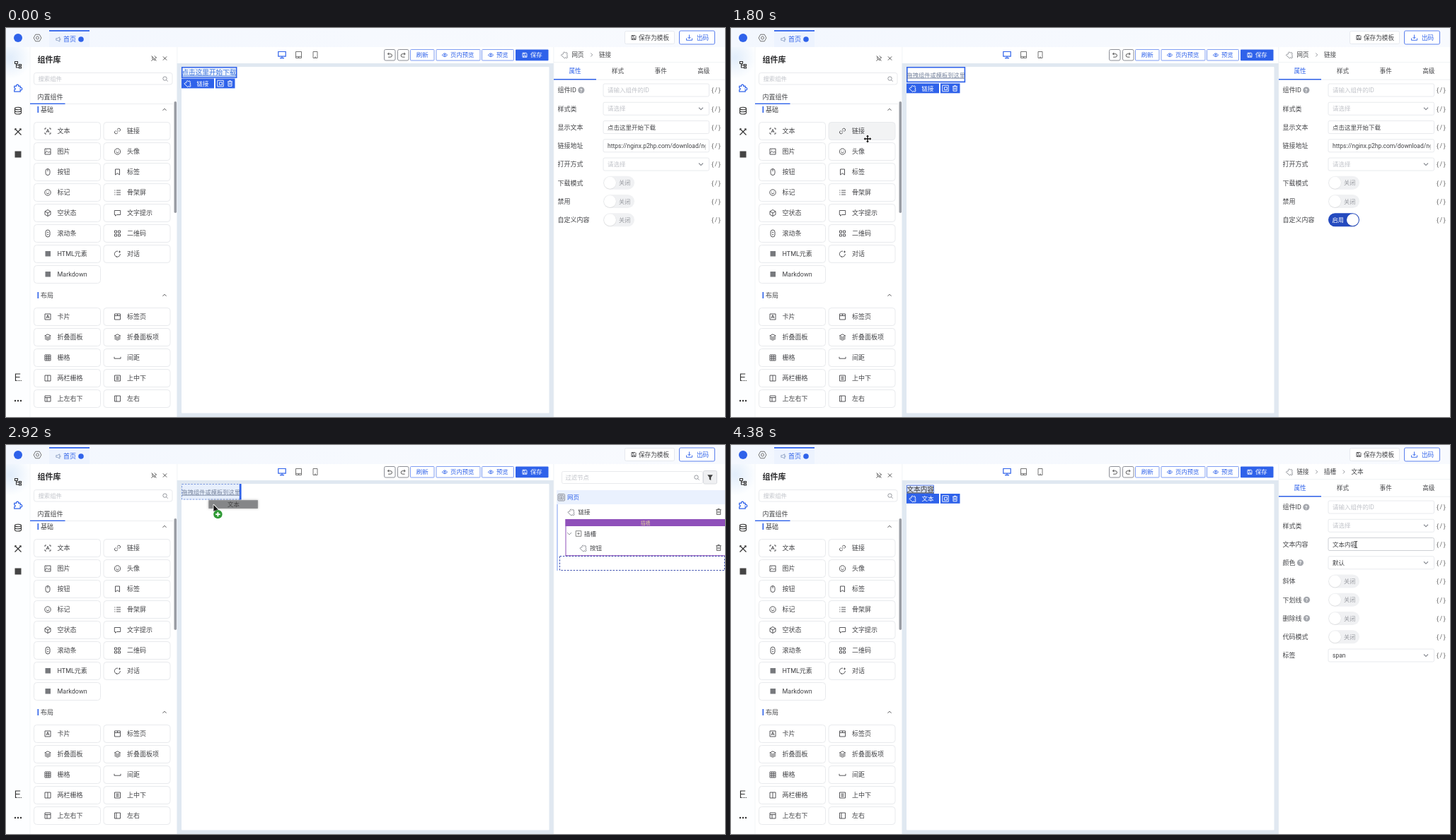
An HTML page with a canvas for the animation above (4.4 s loop, 1016 px wide and 551 px high).

```html
<!DOCTYPE html>
<html lang="zh-CN">
<head>
<meta charset="utf-8">
<title>组件库</title>
<style>
html, body { margin: 0; width: 100%; height: 100%; overflow: hidden; background: #fff; }
canvas { display: block; width: 1016px; height: 551px; }
</style>
</head>
<body>
<canvas id="stage"></canvas>
<script>
const W = 1016, H = 551, LOOP = 4400;
const cv = document.getElementById('stage');
const dpr = window.devicePixelRatio || 1;
cv.width = W * dpr;
cv.height = H * dpr;
const g = cv.getContext('2d');

const BLUE = '#2f62ea', INK = '#444548', GREY = '#8a8d94', HINT = '#c0c3c9', LINE = '#e8eaed', PURPLE = '#8f50ba';
const FONT = 'Roboto, "Noto Sans CJK SC", "Noto Sans CJK", "Noto Sans SC", sans-serif';

// Icon outlines, centred on 0,0
const BOX = 'M-4-4H4V4H-4Z';
const ICONS = {
  text: 'M-4-2V-4H-2M2-4H4V-2M4 2V4H2M-2 4H-4V2M-2 2L0-2.5 2 2M-1.3.8H1.3',
  link: 'M-1.2 1.2L1.2-1.2M-.6-2L1-3.5A2 2 0 0 1 3.8-.8L2.2.8M.6 2L-1 3.5A2 2 0 0 1-3.8.8L-2.2-.8',
  image: BOX + 'M-4 2L-1-.5 1 1.5 2.5 0 4 1.5M-2-2.2h.8',
  face: 'M4.2 0A4.2 4.2 0 1 1-4.2 0 4.2 4.2 0 1 1 4.2 0M-2 .8Q0 3 2 .8M-1.6-1.4v.8M1.6-1.4v.8',
  mouse: 'M-3-1.5A3 3 0 0 1 3-1.5V1.5A3 3 0 0 1-3 1.5ZM0-4.5V-1',
  mark: 'M-3-4H3V4L0 1.8-3 4Z',
  list: 'M-1.5-3H4.5M-1.5 0H4.5M-1.5 3H4.5M-4.2-3h1.2M-4.2 0h1.2M-4.2 3h1.2',
  cube: 'M0-4.5L4-2.3V2.3L0 4.5-4 2.3V-2.3ZM-4-2.3L0 0 4-2.3M0 0V4.5',
  bubble: 'M-4.2-3.5H4.2V2.5H-1L-3 4.2V2.5H-4.2Z',
  scroll: 'M-3-2A3 3 0 0 1 3-2V2A3 3 0 0 1-3 2ZM-1.2-1L0-2.2 1.2-1M-1.2 1L0 2.2 1.2 1',
  four: 'M-4-4h3v3h-3ZM1-4h3v3h-3ZM-4 1h3v3h-3ZM1 1h3v3h-3Z',
  talk: 'M3.8 0A4 4 0 1 1 .5-3.8M-2 3L-1 4.6M3-4.4v2.8M1.6-3h2.8',
  card: BOX + 'M-2 2L0-2.5 2 2M-1.3.8H1.3',
  tabs: BOX + 'M-4-1.5H4M0-4V-1.5',
  layers: 'M0-4.2L4.2-2 0 .2-4.2-2ZM-4.2 0L0 2.2 4.2 0M-4.2 2L0 4.2 4.2 2',
  grid: BOX + 'M-4-1.3H4M-4 1.3H4M-1.3-4V4M1.3-4V4',
  space: 'M-4.5-1.2V1.2H4.5V-1.2',
  cols: BOX + 'M0-4V4',
  rows: BOX + 'M-2-1.8H2M-2 0H2M-2 1.8H2',
  frame: BOX + 'M-4-1.5H4M-1-1.5V4',
  side: BOX + 'M-1.5-4V4',
  puzzle: 'M-4.5-2.5H-1.8A1.6 1.6 0 1 1 1.2-2.5H3.5V-.2A1.6 1.6 0 1 1 3.5 2.4V4.8H-4.5V2.5A1.3 1.3 0 1 0-4.5-.2Z',
  trash: 'M-3.8-3H3.8M-1.2-3V-4.3H1.2V-3M-2.8-3V4.2H2.8V-3M-1-1V2.2M1-1V2.2',
  copy: 'M-4.5-4.5H4.5V4.5H-4.5ZM-1.5 2.2V-1.8H2.5V2.2Z',
  eye: 'M-4 0Q0-5.4 4 0 0 5.4-4 0ZM1.1 0A1.1 1.1 0 1 1-1.1 0 1.1 1.1 0 1 1 1.1 0',
  save: 'M-3.3-3.3H2.3L3.3-2.3V3.3H-3.3ZM-1.5 3.3V1H1.5V3.3M-1.5-3.3V-1.5H1',
  down: 'M0-4V1.5M-2-.5L0 1.5 2-.5M-4 1V3.8H4V1',
  up: 'M-2.5 1.3L0-1.3 2.5 1.3',
  drop: 'M-3-1.5L0 1.5 3-1.5',
  next: 'M-1.2-2.5L1.2 0-1.2 2.5',
  close: 'M-2.6-2.6L2.6 2.6M2.6-2.6L-2.6 2.6',
  pin: 'M-3.8-3.8L3.8 3.8M1-4L4-1 1.5.2M-1.5-2L-3.2-.6.8 3.2 2 1.6M-1.2 1.4L-4 4',
  find: 'M2.2-.4A2.7 2.7 0 1 1-3.2-.4 2.7 2.7 0 1 1 2.2-.4M1.5 1.6L3.6 3.7',
  hex: 'M-2.8-4.8H2.8L5.4 0 2.8 4.8H-2.8L-5.4 0ZM2 0A2 2 0 1 1-2 0 2 2 0 1 1 2 0',
  tree: 'M-4.5-4.5h4v3h-4ZM1.5-.5h3v2h-3ZM1.5 3h3v2h-3ZM-2.5-1.5V4H1.5M-2.5.5H1.5',
  data: 'M-4.5-3A4.5 1.8 0 1 1 4.5-3 4.5 1.8 0 1 1-4.5-3V3.2A4.5 1.8 0 0 0 4.5 3.2V-3M-4.5 0A4.5 1.8 0 0 0 4.5 0',
  tools: 'M-4.5-4.5L4.5 4.5M4.5-4.5L-4.5 4.5M-4.8-2.6L-2.6-4.8M2.4-4.6L4.6-2.4',
  lang: 'M3.2-5H-3.5V4.5H-1.5M-3.5-.5H2.6M-.4 4.5h1.2M1.8 4.5h1.2M4 4.5h1',
  desk: 'M-5.2-4.5H5.2V2.2H-5.2ZM0 2.2V4.6M-3 4.6H3',
  pad: 'M-4-4.5H4V4.5H-4ZM-4 2.4H4M-.7 3.5H.7',
  phone: 'M-3-4.5H3V4.5H-3ZM-1 3.2H1',
  undo: 'M-1-3.8L-3.2-1.8-1 .2M-3.2-1.8H1A2.4 2.4 0 0 1 1 3.2H-2.5',
  redo: 'M1-3.8L3.2-1.8 1 .2M3.2-1.8H-1A2.4 2.4 0 0 0-1 3.2H2.5',
  horn: 'M-3.5-1.5H-1.5L2-3.5V3.5L-1.5 1.5H-3.5ZM3.2-1.2V1.2',
  slot: BOX + 'M0-1.8V1.8M-1.8 0H1.8',
  funnel: 'M-3.8-3.8H3.8L1.2 0V4L-1.2 2.8V0Z'
};
for (const k in ICONS) ICONS[k] = new Path2D(ICONS[k]);

function rect(x, y, w, h, fill) {
  g.fillStyle = fill;
  g.fillRect(x, y, w, h);
}
function box(x, y, w, h, r, fill, line, lw = 1) {
  g.beginPath();
  g.roundRect(x, y, w, h, r);
  if (fill) { g.fillStyle = fill; g.fill(); }
  if (line) { g.strokeStyle = line; g.lineWidth = lw; g.stroke(); }
}
function dot(x, y, r, fill) {
  g.beginPath();
  g.arc(x, y, r, 0, 7);
  g.fillStyle = fill;
  g.fill();
}
function dashed(x, y, w, h, col) {
  g.setLineDash([2.5, 1.8]);
  g.strokeStyle = col;
  g.lineWidth = 1;
  g.strokeRect(x, y, w, h);
  g.setLineDash([]);
}
function text(s, x, y, size = 9, col = INK, align = 'left', weight = 400) {
  g.font = `${weight} ${size}px ${FONT}`;
  g.textAlign = align;
  g.fillStyle = col;
  g.fillText(s, x, y + size * .37);
}
function icon(name, x, y, col = INK, k = 1, lw = .9, turn = 0) {
  g.save();
  g.translate(x, y);
  g.rotate(turn);
  g.scale(k, k);
  g.strokeStyle = col;
  g.lineWidth = lw / k;
  g.stroke(ICONS[name]);
  g.restore();
}

const BASIC = ['text 文本', 'link 链接', 'image 图片', 'face 头像', 'mouse 按钮', 'mark 标签', 'face 标记', 'list 骨架屏',
  'cube 空状态', 'bubble 文字提示', 'scroll 滚动条', 'four 二维码', '- HTML元素', 'talk 对话', '- Markdown'];
const LAYOUT = ['card 卡片', 'tabs 标签页', 'layers 折叠面板', 'layers 折叠面板项', 'grid 栅格', 'space 间距',
  'cols 两栏栅格', 'rows 上中下', 'frame 上左右下', 'side 左右'];

function section(name, y, items, hover) {
  rect(44.5, y - 4.5, 1.6, 9, BLUE);
  text(name, 49, y, 9, INK, 'left', 500);
  icon('up', 224, y);
  items.forEach((item, i) => {
    const [ic, label] = item.split(' ');
    const dx = i % 2 * 98.5, cy = y + 30.5 + (i >> 1) * 29;
    box(39.5 + dx, cy - 12.5, 94, 25, 4, label === hover ? '#f2f3f4' : '#fff', LINE);
    if (ic === '-') rect(55.5 + dx, cy - 4, 7.5, 7.5, '#77797d');
    else icon(ic, 59 + dx, cy);
    text(label, 72.5 + dx, cy);
  });
}

function shell(hover) {
  rect(0, 0, W, H, '#fff');
  let grad = g.createLinearGradient(0, 0, W, 0);
  grad.addColorStop(0, '#f3f7fe');
  grad.addColorStop(.5, '#f6f9fe');
  grad.addColorStop(1, '#f8fafe');
  rect(0, 0, W, 27, grad);
  grad = g.createRadialGradient(6, 42, 2, 6, 42, 30);
  grad.addColorStop(0, '#e3eefb');
  grad.addColorStop(1, '#fdfeff');
  rect(0, 27, 34, H - 27, grad);
  rect(33.5, 27, 1, H - 27, '#f3f5f8');

  dot(17, 14, 6, BLUE);
  icon('hex', 44.5, 14, '#666');
  rect(61, 3, 57, 24, '#edf3fe');
  rect(61, 3, 57, 1.8, BLUE);
  icon('horn', 74, 16, '#8a9cc0', .9);
  text('首页', 81, 16, 9, BLUE, 'left', 500);
  dot(106, 16, 3.8, BLUE);
  box(874.5, 4.5, 70, 18, 2, '#fff', '#e6e9ef');
  icon('save', 887, 13.5, INK, .9);
  text('保存为模板', 894, 13.5, 8.6);
  box(951.5, 4, 50, 19, 2, '#fff', '#5b80ee');
  icon('down', 965.5, 13.5, BLUE);
  text('出码', 976, 13.5, 8.6, BLUE);

  icon('tree', 17, 52, '#333', 1, 1.1);
  icon('puzzle', 16.5, 85, BLUE, 1.05, 1.2);
  icon('data', 17, 117, '#333', 1, 1.1);
  icon('tools', 17, 147, '#333', 1, 1.2);
  rect(12.5, 174.5, 9, 9, '#444');
  icon('lang', 17, 495, '#333', 1, 1.2);
  for (const x of [13, 17, 21]) dot(x, 528, 1.2, '#333');

  text('组件库', 44.5, 44.5, 11, '#2b2b2d', 'left', 700);
  icon('pin', 209, 43, '#444', .9);
  icon('close', 224.5, 43, '#444');
  box(39.5, 63.5, 195.5, 16.5, 3, '#fff', LINE);
  text('搜索组件', 45.5, 72, 8.4, HINT);
  icon('find', 225, 72, GREY);
  text('内置组件', 44.5, 97.5, 9);
  rect(34, 107, 202, .8, LINE);
  rect(34, 106.6, 49.5, 1.4, BLUE);
  section('基础', 115.5, BASIC, hover);
  section('布局', 378.5, LAYOUT);
  box(237.5, 104, 3.6, 158, 1.8, '#9a9da4');

  rect(241.5, 50, 532.5, H - 50, '#e0e8f1');
  box(248, 55, 519.5, 490.5, 1, '#fff');
  rect(241.5, 27, .8, 23, '#eef0f4');
  icon('desk', 390, 38, BLUE, 1, 1.2);
  icon('pad', 413.5, 38, '#666');
  icon('phone', 437, 38, '#666');
  for (const [ic, x] of [['undo', 534.5], ['redo', 553.5]]) {
    box(x, 30.5, 15.5, 15.5, 2, '#fff', '#8b8e96');
    icon(ic, x + 7.8, 38.3, '#444', .9);
  }
  for (const [x, w] of [[571.5, 33.5], [608, 62], [672.5, 45]]) box(x, 30.5, w, 15.5, 1, '#fff', '#7f9df2');
  text('刷新', 588.3, 38.3, 8.5, BLUE, 'center');
  icon('eye', 620, 38.3, BLUE, .9);
  text('页内预览', 628, 38.3, 8.4, BLUE);
  icon('eye', 685, 38.3, BLUE, .9);
  text('预览', 693, 38.3, 8.4, BLUE);
  box(720, 30.5, 46.5, 15.8, 1, BLUE);
  icon('save', 733, 38.3, '#fff', .9);
  text('保存', 741, 38.3, 8.4, '#fff');
  rect(773.5, 27, .8, H - 27, '#eceff4');
}

function tag(name, y) {
  rect(248, y, 46, 13.8, BLUE);
  icon('puzzle', 257.5, y + 7, '#fff', .85, .9, .75);
  text(name, 269.5, y + 7, 8.5, '#fff');
  rect(296, y, 27.5, 13.8, BLUE);
  icon('copy', 303, y + 7, '#fff', .95);
  icon('trash', 316.5, y + 7, '#fff', .9);
}
function underlined(s, y, size, col) {
  text(s, 248.5, y, size, col);
  rect(248.5, y + size * .5, s.length * size, .9, col);
}

function page(mode, over) {
  if (mode === 'link') {
    box(248.7, 55.8, 77, 14.4, 0, '#edf3fd', BLUE, 1.6);
    underlined('点击这里开始下载', 62.7, 9.65, '#3b74dd');
    tag('链接', 71.6);
  } else if (mode === 'text') {
    box(248.5, 57, 38, 11.6, 0, '#d6deef', '#5b7fe6', 1);
    underlined('文本内容', 62.7, 9.6, '#333');
    tag('文本', 69);
  } else {
    const slot = '拖拽组件或模板到这里';
    if (mode === 'slot') {
      box(248.8, 55.8, 81.6, 20.6, 0, '#fff', BLUE, 1.6);
      tag('链接', 78.5);
    } else {
      rect(248, 55, 83, 22.5, over === 'inside' ? '#a9bbf8' : '#e7effc');
      dashed(248.5, 55.5, 82, 21.5, '#7a97dd');
      if (over === 'after') rect(329.8, 55, 2.8, 22.5, BLUE);
    }
    underlined(slot, 66.5, 8.25, '#75829c');
  }
}

const mix = (a, b, k) => a + (b - a) * k;
const clamp = k => Math.max(0, Math.min(1, k));
const ease = k => k * k * (3 - 2 * k);

function toggle(y, on, dark) {
  const c = [mix(240, mix(47, 34, dark), on), mix(241, mix(98, 70, dark), on), mix(243, mix(234, 184, dark), on)];
  box(844, y - 9.5, 44, 19, 9.5, `rgb(${c})`);
  const x = mix(853.5, 878.5, on);
  dot(x, y + .4, 9, 'rgba(0,0,0,.07)');
  dot(x, y, 8.5, '#fff');
  if (on > .5) text('启用', 849.5, y, 8.2, '#fff');
  else text('关闭', 866, y, 8.2, '#9a9ca2');
}

function crumbs(names) {
  icon('puzzle', 790, 38, GREY, .85, .9, .75);
  names.forEach((n, i) => {
    const x = 799.5 + i * 38.5;
    text(n, x, 38, 8.6);
    if (i < names.length - 1) icon('next', x + 28, 38, GREY);
  });
}

// label, kind (i input, s select, t toggle), value, placeholder flag, help flag
const LINK_ROWS = [['组件ID', 'i', '请输入组件的ID', 1, 1], ['样式类', 's', '请选择', 1], ['显示文本', 'i', '点击这里开始下载'],
  ['链接地址', 'i', 'https://nginx.p2hp.com/download/nginx'], ['打开方式', 's', '请选择', 1], ['下载模式', 't'], ['禁用', 't'], ['自定义内容', 't']];
const TEXT_ROWS = [['组件ID', 'i', '请输入组件的ID', 1, 1], ['样式类', 's', '请选择', 1], ['文本内容', 'i', '文本内容'],
  ['颜色', 's', '默认', 0, 1], ['斜体', 't'], ['下划线', 't', '', 0, 1], ['删除线', 't', '', 0, 1], ['代码模式', 't'], ['标签', 's', 'span']];

function props(path, rows, on, dark, focus) {
  crumbs(path);
  rect(774, 48, W - 774, .8, '#eef0f3');
  ['属性', '样式', '事件', '高级'].forEach((n, i) => text(n, 804 + i * 60.6, 61, 8.6, i ? INK : BLUE, 'center', i ? 400 : 500));
  rect(774, 72.7, W - 774, .8, LINE);
  rect(774, 72, 60, 1.5, BLUE);
  rows.forEach(([label, kind, value, hint, help], i) => {
    const y = 88 + i * 26.25;
    text(label, 779.5, y);
    if (help) {
      const x = 779.5 + g.measureText(label).width + 7;
      dot(x, y, 4.6, '#a5a8ae');
      text('?', x, y, 7, '#fff', 'center', 600);
    }
    if (kind === 't') toggle(y, i === 7 ? on : 0, dark);
    else {
      box(844, y - 9, 149.5, 18, 2, '#fff', focus && i === 2 ? '#cdd0d5' : LINE);
      g.save();
      g.beginPath();
      g.rect(846, y - 9, 142.5, 18);
      g.clip();
      text(value, 850, y, 8.5, hint ? HINT : INK);
      g.restore();
      if (kind === 's') icon('drop', 982, y, GREY, 1, 1.1);
    }
    g.letterSpacing = '1.5px';
    text('{/}', 997, y, 9, '#666');
    g.letterSpacing = '0px';
  });
}

function outline(over) {
  const after = over === 'after';
  box(785.5, 37.5, 199, 17, 2, '#fff', LINE);
  text('过滤节点', 790.5, 46, 8.4, HINT);
  icon('find', 976, 46, GREY);
  box(985.5, 36.5, 19, 18.5, 2, '#eff0f2', '#d9dbe0');
  g.save();
  g.translate(995, 46);
  g.fillStyle = '#444';
  g.fill(ICONS.funnel);
  g.restore();
  rect(778, 64, W - 778, 20, after ? '#eaf1fe' : '#f5f6f8');
  box(780, 69.5, 9.5, 9.5, 1, null, GREY);
  icon('rows', 784.7, 74.2, GREY, .7);
  text('网页', 793, 74, 8.5, after ? BLUE : INK);
  rect(778.5, 84, 1, after ? 94 : 73, after ? '#7d9cf0' : '#eceef2');
  icon('puzzle', 799.5, 95, GREY, .85, .9, .75);
  text('链接', 808.5, 95, 8.5);
  icon('trash', 1007, 94.5, '#555', .95);
  rect(790.5, 105, W - 790.5, 10, PURPLE);
  text('插槽', 903.5, 110, 6.8, '#dccb9e', 'center');
  rect(790.5, 105, 1, 52, PURPLE);
  rect(790.5, 156.2, W - 790.5, 1, PURPLE);
  icon('drop', 796, 125.5, GREY, 1, .9);
  icon('slot', 809, 125.5, '#777', .95);
  text('插槽', 817, 125.5, 8.5);
  icon('puzzle', 816.5, 146, GREY, .85, .9, .75);
  text('按钮', 825, 146, 8.5);
  icon('trash', 1007, 145.5, '#555', .95);
  if (after) dashed(782.5, 157.5, 233, 20, '#3d4fae');
}

const ARROW = new Path2D('M0 0V9.6L2.2 7.6 3.7 11 5.2 10.3 3.7 7H6.6Z');
const MOVE = new Path2D('M0-5.4L2-3.2H.7V-.7H3.2V-2L5.4 0 3.2 2V.7H.7V3.2H2L0 5.4-2 3.2H-.7V.7H-3.2V2L-5.4 0-3.2-2V-.7H-.7V-3.2H-2Z');
const BEAM = new Path2D('M-2-4.5Q0-4.5 0-3.5 0-4.5 2-4.5M0-3.5V3.5M-2 4.5Q0 4.5 0 3.5 0 4.5 2 4.5');
function cursor(shape, x, y) {
  g.save();
  g.translate(x, y);
  g.lineJoin = 'round';
  g.strokeStyle = '#fff';
  g.lineWidth = shape === BEAM ? 2.4 : 1.6;
  g.stroke(shape);
  if (shape === BEAM) {
    g.strokeStyle = '#111';
    g.lineWidth = 1;
    g.stroke(shape);
  } else {
    g.fillStyle = '#111';
    g.fill(shape);
  }
  g.restore();
}
function ghost(x, y) {
  g.save();
  g.shadowColor = 'rgba(0,0,0,.35)';
  g.shadowBlur = 3 * dpr;
  rect(x - 7, y - 6.5, 69.5, 11.8, 'rgba(122,124,126,.82)');
  g.restore();
  text('文本', x + 28, y - .4, 8.4, '#444', 'center');
}

// Pointer path: time, x, y
const PATH = [[1040, 1022, 360], [1340, 868, 273], [1540, 866, 273], [1800, 193, 157], [1880, 190, 156], [2180, 113, 149],
  [2450, 112, 149], [2660, 287, 93], [2760, 288, 92], [3140, 302, 73], [3220, 302, 72], [3840, 302, 72], [4340, 883, 141], [4400, 883, 141]];
function pointer(t) {
  if (t <= PATH[0][0]) return null;
  const i = PATH.findIndex(p => p[0] >= t);
  const [t0, x0, y0] = PATH[i - 1], [t1, x1, y1] = PATH[i];
  const k = ease((t - t0) / (t1 - t0));
  return [mix(x0, x1, k), mix(y0, y1, k)];
}

const CLICK = 1400, DRAG = 2480, DROP = 3600;
function draw(t) {
  const p = pointer(t);
  const [x, y] = p || [-99, -99];
  const drag = t >= DRAG && t < DROP;
  const inCell = !drag && y > 133 && y < 159 && x > 39 && x < 233;
  const hover = inCell ? (x < 134 ? '文本' : x > 138 ? '链接' : '') : '';
  const over = drag && x > 248 ? (x < 331 && y < 77.5 ? 'inside' : 'after') : '';

  g.setTransform(dpr, 0, 0, dpr, 0, 0);
  shell(hover);
  page(t < CLICK ? 'link' : t < DRAG ? 'slot' : t < DROP ? 'drag' : 'text', over);

  const field = t >= DROP && x > 844 && x < 993 && y > 131 && y < 150;
  if (drag) outline(over);
  else if (t < DROP) {
    const dark = 1 - clamp((t - 1780) / 160);
    props(['网页', '链接'], LINK_ROWS, ease(clamp((t - CLICK) / 160)), dark);
  } else props(['链接', '插槽', '文本'], TEXT_ROWS, 0, 0, field);

  if (!p) return;
  if (drag) {
    ghost(x, y);
    cursor(ARROW, x, y);
    if (over) {
      dot(x + 6, y + 13.5, 6.2, '#2f9a35');
      rect(x + 2.8, y + 12.6, 6.4, 1.8, '#fff');
      rect(x + 5.1, y + 10.3, 1.8, 6.4, '#fff');
    }
  } else cursor(inCell ? MOVE : field ? BEAM : ARROW, x, y);
}

const start = performance.now();
function tick() {
  draw((performance.now() - start) % LOOP);
  requestAnimationFrame(tick);
}
tick();
</script>
</body>
</html>
```
